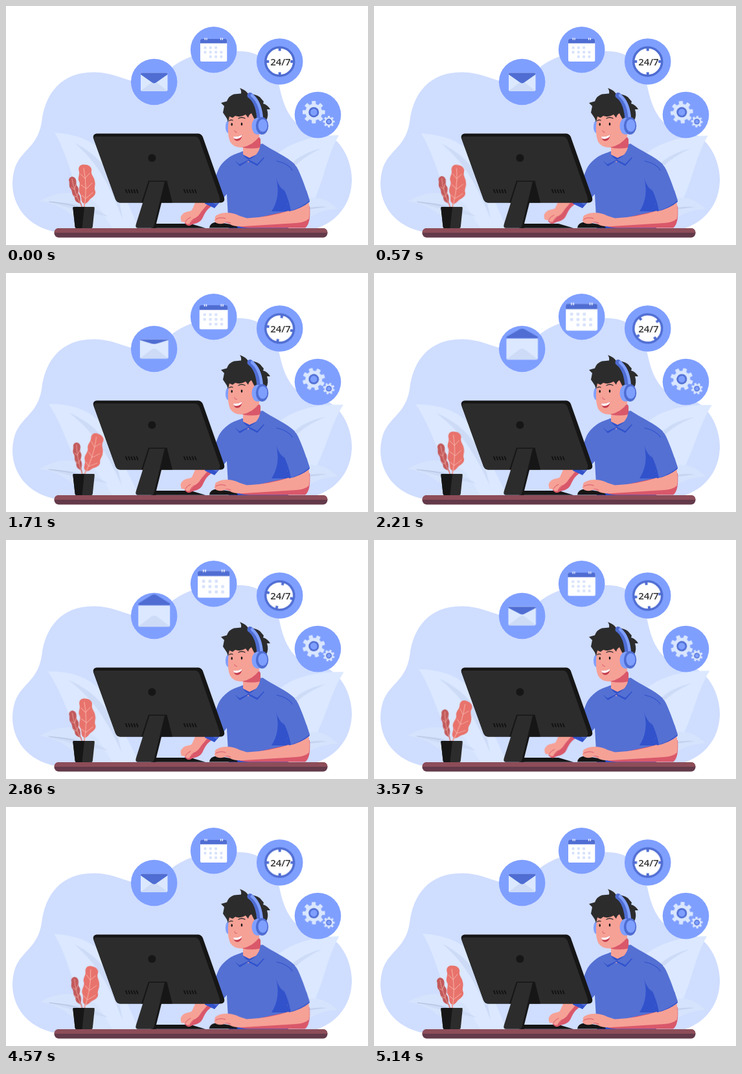
Animation, 559 px wide and 370 px high, one loop 5210 ms. Source, as an HTML page:

```html
<!DOCTYPE html>
<html lang="en">
<head>
<meta charset="utf-8">
<title>Support desk</title>
<style>
  html, body { margin: 0; width: 100%; height: 100%; overflow: hidden; background: #fff; }
  svg { display: block; width: 559px; height: 370px; }
  text { font: 600 15px "Open Sans", "Noto Sans", sans-serif; fill: #333; text-anchor: middle; }
  .sky { fill: #7f9fff; }
  .navy { fill: #4f6dd2; }
  .pale { fill: #dbe8ff; }
  .mist { fill: #cddbf7; }
  .skin { fill: #f6a196; }
  .blush { fill: #d9586a; }
  .shirt { fill: #5470d3; }
  .fold { fill: #3152cb; }
  .coal { fill: #2c2c2c; }
  .ink { fill: #161616; }
  .line { fill: none; stroke-linecap: round; stroke-linejoin: round; }
</style>
</head>
<body>
<svg viewBox="0 0 559 370">
  <path fill="#cfddff" d="M10 275C11 222 47 228 55 180C60 135 86 102 136 102.5C165 103 178 113 200 117L245 104C258 92 272 83 290 77C315 72 340 69 362 70C402 71 415 98 422 124C430 164 445 190 480 195C512 196 535 235 534 272C532 316 500 345 455 350H78C32 342 10 308 10 275Z"/>

  <g id="leafL">
    <path class="pale" d="M75 196C115 199 146 212 163 245L205 345H150C105 308 104 245 75 196Z"/>
    <path class="mist" d="M106 212C130 224 158 246 172 285L180 330C160 275 140 242 106 212Z"/>
  </g>
  <g id="leafR">
    <path class="pale" d="M514 200C470 201 428 212 405 244L425 345H446C490 300 488 245 514 200Z"/>
    <path class="mist" d="M488 220C462 226 442 238 430 258L432 266C444 246 462 232 488 220Z"/>
  </g>
  <g id="lowL">
    <path fill="#d6e3fc" d="M52 302C82 284 118 284 142 308L165 345H125C98 320 84 306 52 302Z"/>
    <path class="mist" d="M66 303C106 305 132 309 158 326C122 319 94 312 66 303Z"/>
    <path class="line" stroke="#aebedb" d="M67 303Q95 306 112 311"/>
  </g>
  <g id="lowR">
    <path fill="#d6e3fc" d="M512 314C490 293 468 293 450 303L448 345C464 326 484 316 512 314Z"/>
    <path fill="#c3d1ee" d="M496 311Q474 309 450 317Q474 314 496 311Z"/>
  </g>

  <g class="sky">
    <circle cx="228.7" cy="117.5" r="35.8"/>
    <circle cx="320.7" cy="67.7" r="35.8"/>
    <circle cx="422.7" cy="86" r="35.8"/>
    <circle cx="481.5" cy="168.6" r="35.8"/>
  </g>

  <g id="mail">
    <rect class="pale" x="208" y="103.5" width="41.5" height="28.2" rx="2"/>
    <path class="mist" d="M208.6 131L225 118.5Q228.7 116 232.5 118.5L249 131L247.5 131.7H210Z"/>
    <path id="flap" class="navy" d="M208 106V105Q208 103.5 210 103.5H247.5Q249.5 103.5 249.5 105V106L231.8 118.5Q228.7 120.6 225.7 118.5Z"/>
  </g>

  <g id="cal">
    <rect x="300" y="51" width="41.3" height="35" rx="2" fill="#fff"/>
    <path class="navy" d="M300 57.8V53Q300 51 302 51H339.3Q341.3 51 341.3 53V57.8Z"/>
    <path class="line" stroke="#fff" stroke-width="1.3" d="M307.3 49.8V52.2M310 49.8V52.2M331.6 49.8V52.2M334.3 49.8V52.2"/>
    <g id="days" fill="#d6e1fb"></g>
  </g>

  <circle cx="422.7" cy="86" r="22" fill="#fff"/>
  <g id="ring">
    <circle cx="422.7" cy="86" r="22" fill="none" stroke="#4f6dd2" stroke-width="3.5"/>
    <path fill="none" stroke="#4f6dd2" stroke-width="4" d="M422.7 64V69.5M422.7 102.5V108M400.7 86H406.2M439.2 86H444.7"/>
  </g>
  <text x="423.9" y="91.5">24/7</text>

  <g id="gearA"></g>
  <g id="gearB"></g>

  <!-- plant -->
  <g id="stemL">
    <path fill="#c25a5b" d="M115.5 306C108 304 106 301 106 296C101 292 103 287 100 283C96 279 99 274 97 270C97 264 104 262 107 267C110 271 107 275 110 279C114 283 110 288 113 292C116 297 114 302 115.5 306Z"/>
    <path class="line" stroke="#c25a5b" stroke-width="1.6" d="M115 305L118 313"/>
    <path class="line" stroke="#efa39b" stroke-width=".9" d="M102 268Q105 287 117 311M101 281L105.5 284L108 276M104 293L109 296L112 288"/>
  </g>
  <g id="stemR">
    <path fill="#e8736c" d="M121 306C114 303 118 297 114.5 291C110 285 115 280 113.5 273C109 266 115 262 112.5 255C111 248 116 245 120 245.5C127 245 133 249 132 255C131 262 136 264 137 271C139 278 135 281 138 287C139 294 132 297 129 300C126 304 124 306 121 306Z"/>
    <path class="line" stroke="#e8736c" stroke-width="1.8" d="M121.5 304L121 313"/>
    <path class="line" stroke="#f8bbb2" stroke-width=".9" d="M120 251Q126 280 121 313M115 260L122 267L129 259M116 277L124 283L133 274M117 293L123 298L134 289"/>
  </g>
  <path class="coal" d="M104.5 311H135.5Q137 311 136.8 313L133.8 342Q133.5 344 132 344H108.5Q107 344 106.6 342L103.4 313Q103.3 311 104.5 311Z"/>
  <path class="ink" d="M104.5 311H121L117.5 344H108.5Q107 344 106.6 342L103.4 313Q103.3 311 104.5 311Z"/>

  <!-- far arm -->
  <path class="ink" d="M226 337H285L308 343.7H226Z"/>
  <g id="armL">
    <path class="blush" d="M300 294H332L316 311C306 318 306 326 301 332C296 337 291 336 284 340Q279 341 276 336Z"/>
    <path class="skin" d="M296 294H322L306 313C300 319 299 324 294 327C289 330 287 333 284 337Q279 339 277 335L271 334Q268 327 272 323C277 317 284 319 287 316Q291 308 296 294Z"/>
    <path class="line" stroke="#d9586a" stroke-width="1" d="M277 334Q280 329 285 327M284 337Q286 331 291 329"/>
  </g>
  <path class="fold" d="M335 245C325 260 313 288 307 306L322 313L346 285Z"/>
  <path class="shirt" d="M352 231C338 237 330 246 326 258L311 300L325 308L350 280Z"/>

  <!-- torso -->
  <path class="shirt" d="M363 226C347 231 337 237 333 250C336 262 340 278 341 292L344 344H436L434 300L446 245C434 233 412 224 396 213Z"/>
  <path class="fold" d="M417 266C422 285 420 303 410 318H438L436 290C428 286 421 280 417 266ZM344 341H436V344H344Z"/>
  <path class="skin" d="M366 205H392L394 219Q390 233 374 242Q365 235 366 228Z"/>
  <path class="blush" d="M365 214L391 203L393 206V219Q379 222 365 219Z"/>
  <path class="fold" d="M354 240L361 248L374 240L388 247.5L399 235L391 228L376 235L364 229Z"/>
  <path class="shirt" d="M364 225L353.5 239.5L360.5 245L375 238Q366 234 364 225ZM393 213Q392 230 375 238L388 244.5L398 234Q399 221 393 213Z"/>

  <!-- near arm -->
  <g id="armR">
    <path class="ink" d="M314 343.6Q315 335 326 334.5L347 338Q358 340 358 343.6Z"/>
    <path class="blush" d="M360 334L469 310Q471 337 462 343.5H375Q362 343 352 338Z"/>
    <path class="skin" d="M434 306L467 300Q470 318 468 329Q462 335 448 336L368 341Q353 342 346 338L339 335Q333 339 325 336Q320 333 323 329Q321 324 332 321Q347 318 361 325L372 328.5Q408 327 440 316Z"/>
    <path class="line" stroke="#d9586a" stroke-width="1" d="M324 330Q332 326 339 329M339 335Q344 334 347 336"/>
  </g>
  <g id="sleeve">
    <path class="fold" d="M428 280L437 318Q456 314 469 303L464 286Z"/>
    <path class="shirt" d="M418 232C434 236 446 242 451 253C458 268 464 286 469 301Q456 312 440 317C437 301 432 288 424 274Z"/>
    <path class="line" stroke="#3152cb" stroke-width="1.2" d="M418 240Q436 244 442 254"/>
  </g>

  <!-- head -->
  <ellipse class="sky" cx="343" cy="187" rx="4" ry="9.5"/>
  <path class="skin" d="M345 164L343 185Q342 200 346 210Q351 219 364 219Q381 216 391 202L394 160Z"/>
  <path class="coal" d="M341 174L335 165L337 155L332 150L341 147.5Q344 139 352 136.5L363 135.5Q364 131 361 127Q370 130 374 136Q385 136 392 141L398 148L397 151Q404 153 408 160L403 160Q406 170 402 177L390 181L383 174L379 166Q375 168 374 173L370 168Q362 173 354 170L350 173L345 171L343 180Z"/>
  <path class="line" stroke="#4f6dd2" stroke-width="9" stroke-linecap="butt" d="M377 138.5Q391 149 392 178"/>
  <path class="line" stroke="#7f9fff" stroke-width="4.5" stroke-linecap="butt" d="M380 138.5Q394 150 395 177"/>
  <ellipse class="sky" cx="388.5" cy="186" rx="9" ry="13"/>
  <ellipse class="navy" cx="395.5" cy="185.5" rx="9.7" ry="13.5"/>
  <ellipse class="sky" cx="396.5" cy="185" rx="7" ry="9.8"/>
  <ellipse cx="348.7" cy="183.3" rx="1.2" ry="2.3" class="ink"/>
  <ellipse cx="364" cy="182.8" rx="1.3" ry="2.4" class="ink"/>
  <path class="line" stroke="#2c2c2c" stroke-width="1.4" d="M345 177.5Q347.5 175.5 350 177M359 174Q364 171 369 174"/>
  <path class="line" stroke="#d9586a" stroke-width=".9" d="M353 192.5Q352.5 196 356.5 195.5"/>
  <path fill="#c43c4d" d="M351 202Q358 203 364.5 199.5Q364 208.5 357 209Q352 208.5 351 202Z"/>
  <path fill="#fff" d="M351 202Q358 203 364.5 199.5Q364 204 358 205.5Q354 206 351.7 204.7Z"/>

  <!-- monitor -->
  <path class="ink" d="M140 197.5H297Q302 198 304 203L337 297Q338.5 304 332 304.5H176Q171 304 169 299L135 205Q133.5 198 140 197.5Z"/>
  <path class="coal" d="M139 202H292Q297 202.5 299 208L330 297Q331.5 304 326 304.5H176Q171 304 169 299L136.5 208Q134.5 202 139 202Z"/>
  <circle class="ink" cx="225.4" cy="235.2" r="6"/>
  <path id="vents" class="line" stroke="#121212" stroke-width="2"/>
  <path class="ink" d="M220 270.5H248.5L257 304.5H209Z"/>
  <path class="ink" d="M240 271H248.5L240 305L232 337V343.7H224Z"/>
  <path class="coal" d="M221.5 272H245L229 338Q228 343.7 225 343.7H203Q199 343 201 337Z"/>

  <rect x="74.5" y="344" width="422" height="14.5" rx="7" fill="#633a4a"/>
  <path fill="#8d4d59" d="M74.5 351Q75 344 81.5 344H489.5Q496 344 496.5 351Z"/>
</svg>
<script>
const LOOP = 5210, HALF = LOOP / 2;
const SINE = 'cubic-bezier(.4,0,.4,1)';
const CUBIC = 'cubic-bezier(.65,0,.35,1)';
const $ = id => document.getElementById(id);

function gear(id, x, y, r, tooth, hub) {
  let teeth = '';
  for (let a = 0; a < 360; a += 45)
    teeth += `<rect x="${x - tooth / 2}" y="${y - r}" width="${tooth}" height="${r}" rx="${tooth / 6}" transform="rotate(${a} ${x} ${y})"/>`;
  $(id).innerHTML = `<g fill="#d9e6ff">${teeth}<circle cx="${x}" cy="${y}" r="${r * .75}"/></g>
    <circle class="navy" cx="${x}" cy="${y}" r="${hub}"/><circle class="sky" cx="${x}" cy="${y}" r="${hub * .66}"/>`;
}
gear('gearA', 475.3, 164.4, 17.3, 6.2, 8);
gear('gearB', 498.6, 179, 9, 3.2, 4.4);

let days = '';
for (let row = 0; row < 3; row++)
  for (let col = row > 1 ? 1 : 0; col < (row ? 4 : 3); col++)
    days += `<rect x="${305.6 + col * 8.3}" y="${62.6 + row * 7}" width="3.8" height="3.8" rx=".6"/>`;
$('days').innerHTML = days;

let vents = '';
for (const x of [185, 275])
  for (let i = 0; i < 5; i++) vents += `M${x + i * 4.2} 284.5l1.8 4.5`;
$('vents').setAttribute('d', vents);

// steps: [time, transform]
function move(id, origin, easing, steps) {
  const el = $(id);
  el.style.transformOrigin = origin;
  const last = steps[steps.length - 1];
  const all = [[0, steps[0][1]], ...steps, [LOOP, last[1]]];
  el.animate(all.map(([t, transform]) => ({ offset: t / LOOP, transform, easing })),
    { duration: LOOP, iterations: Infinity });
}
const rot = a => `rotate(${a}deg)`;
const swing = (id, origin, a, easing = 'cubic-bezier(.3,0,.4,1)') =>
  move(id, origin, easing, [[0, rot(0)], [HALF, rot(a)], [LOOP, rot(0)]]);
const sway = (id, origin, a) =>
  move(id, origin, CUBIC, [0, 1, 2, 3, 4].map(i => [LOOP * i / 4, rot(i % 2 ? a : 0)]));
const pulse = (id, origin, from, to) =>
  move(id, origin, 'cubic-bezier(.5,0,.4,1)', [[1200, from], [HALF, to], [4010, from]]);
const reach = (id, origin, rest, out, times) =>
  move(id, origin, SINE, times.map((t, i) => [t, i % 3 === 1 ? out : rest]));

swing('leafL', '170px 345px', -4.3);
swing('leafR', '435px 345px', 3.2);
swing('lowL', '150px 345px', -1);
swing('lowR', '450px 330px', 1);
sway('stemL', '118px 313px', 10);
sway('stemR', '121px 313px', 21);

pulse('mail', '228.7px 117.5px', 'scale(1)', 'scale(1.19)');
pulse('flap', '228.7px 103.5px', 'scaleY(1)', 'scaleY(-1)');
pulse('cal', '320.7px 68.5px', 'scale(1)', 'scale(1.2)');
move('ring', '422.7px 86px', 'cubic-bezier(.62,0,.38,1)', [[1205, rot(0)], [4005, rot(270)]]);
swing('gearA', '475.3px 164.4px', 180, 'linear');
swing('gearB', '498.6px 179px', -180, 'linear');

const shift = (x, y, a) => `translate(${x}px,${y}px) rotate(${a}deg)`;
reach('armL', '0 0', shift(0, 0, 0), shift(-9, -4, 0), [0, 450, 900, 2950, 3420, 3900]);
const press = [680, 1180, 1750, 3640, 4130, 4720];
reach('armR', '465px 342px', shift(0, 0, 0), shift(-4, 0, .9), press);
reach('sleeve', '440px 240px', rot(0), rot(2.5), press);
</script>
</body>
</html>
```
